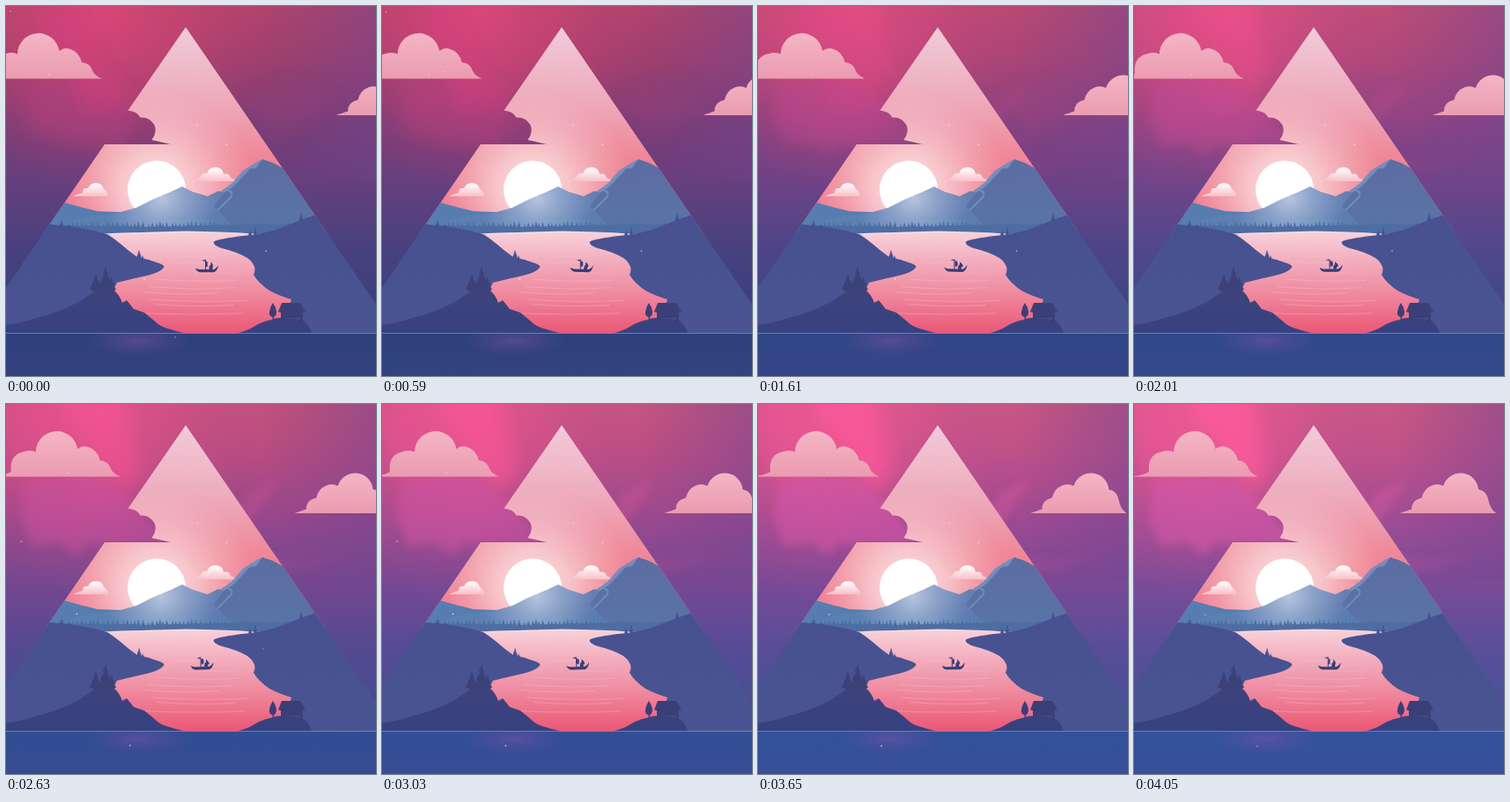
Recreate the animation shown at these times as an HTML page. Size 420 px wide and 420 px high, loop 4250 ms.

```html
<!DOCTYPE html>
<html lang="en">
<head>
<meta charset="utf-8">
<title>Lake at dusk</title>
<style>
html, body { margin: 0; width: 100%; height: 100%; overflow: hidden; background: #303f7b; }
svg { display: block; width: 100vw; height: 100vh; }
</style>
</head>
<body>
<svg viewBox="0 0 420 420" xmlns="http://www.w3.org/2000/svg">
<defs>
  <linearGradient id="duskA" x1="0" y1="0" x2="0" y2="1">
    <stop offset="0" stop-color="#b1446a"/><stop offset=".15" stop-color="#a0406d"/>
    <stop offset=".35" stop-color="#7d3d76"/><stop offset=".55" stop-color="#643f7d"/>
    <stop offset=".75" stop-color="#46417e"/><stop offset="1" stop-color="#34407a"/>
  </linearGradient>
  <linearGradient id="duskB" x1="0" y1="0" x2="0" y2="1">
    <stop offset="0" stop-color="#cb5882"/><stop offset=".15" stop-color="#c0528a"/>
    <stop offset=".35" stop-color="#9f4c94"/><stop offset=".55" stop-color="#7a4b98"/>
    <stop offset=".75" stop-color="#594e9a"/><stop offset="1" stop-color="#465299"/>
  </linearGradient>
  <linearGradient id="sideShade" gradientUnits="userSpaceOnUse" x1="290" y1="20" x2="425" y2="0">
    <stop offset="0" stop-color="#6f4690" stop-opacity="0"/><stop offset="1" stop-color="#6f4690" stop-opacity=".5"/>
  </linearGradient>
  <radialGradient id="glowA" gradientUnits="userSpaceOnUse" cx="110" cy="10" r="200">
    <stop offset="0" stop-color="#dd467a" stop-opacity=".9"/><stop offset=".45" stop-color="#d04573" stop-opacity=".55"/>
    <stop offset="1" stop-color="#b04070" stop-opacity="0"/>
  </radialGradient>
  <radialGradient id="glowB" gradientUnits="userSpaceOnUse" cx="80" cy="10" r="210">
    <stop offset="0" stop-color="#f95a99" stop-opacity=".85"/><stop offset=".45" stop-color="#e25694" stop-opacity=".55"/>
    <stop offset="1" stop-color="#b04f90" stop-opacity="0"/>
  </radialGradient>
  <linearGradient id="baseA" x1="0" y1="0" x2="0" y2="1">
    <stop offset="0" stop-color="#2d417c"/><stop offset="1" stop-color="#34427f"/>
  </linearGradient>
  <linearGradient id="baseB" x1="0" y1="0" x2="0" y2="1">
    <stop offset="0" stop-color="#31539c"/><stop offset="1" stop-color="#3a4f9a"/>
  </linearGradient>
  <radialGradient id="mirror" gradientUnits="userSpaceOnUse" cx="150" cy="380" r="62" gradientTransform="translate(0 266) scale(1 .3)">
    <stop offset="0" stop-color="#8a55ac" stop-opacity=".42"/><stop offset="1" stop-color="#7a4a9a" stop-opacity="0"/>
  </radialGradient>
  <linearGradient id="cloudFill" x1="0" y1="0" x2="0" y2="1">
    <stop offset="0" stop-color="#f4b5c4"/><stop offset="1" stop-color="#eb9bb1"/>
  </linearGradient>
  <linearGradient id="puffFill" x1="0" y1="0" x2="0" y2="1">
    <stop offset=".2" stop-color="#fff5f5"/><stop offset="1" stop-color="#f8c0c8"/>
  </linearGradient>
  <linearGradient id="sky" gradientUnits="userSpaceOnUse" x1="0" y1="24" x2="0" y2="250">
    <stop offset="0" stop-color="#f1cbda"/><stop offset=".38" stop-color="#eea9ba"/>
    <stop offset=".65" stop-color="#ef8798"/><stop offset="1" stop-color="#ee6f86"/>
  </linearGradient>
  <radialGradient id="halo" gradientUnits="userSpaceOnUse" cx="171" cy="208" r="118">
    <stop offset="0" stop-color="#fff4f2" stop-opacity=".85"/><stop offset=".35" stop-color="#fde0e0" stop-opacity=".6"/>
    <stop offset=".65" stop-color="#fbcfd2" stop-opacity=".24"/><stop offset="1" stop-color="#f7a8b2" stop-opacity="0"/>
  </radialGradient>
  <linearGradient id="midHill" gradientUnits="userSpaceOnUse" x1="0" y1="205" x2="0" y2="256">
    <stop offset="0" stop-color="#687fb1"/><stop offset="1" stop-color="#587cb0"/>
  </linearGradient>
  <linearGradient id="peak" gradientUnits="userSpaceOnUse" x1="0" y1="174" x2="0" y2="258">
    <stop offset="0" stop-color="#5c6da2"/><stop offset="1" stop-color="#5974a7"/>
  </linearGradient>
  <radialGradient id="shine" gradientUnits="userSpaceOnUse" cx="176" cy="218" r="64">
    <stop offset="0" stop-color="#d3dcee" stop-opacity=".75"/><stop offset=".5" stop-color="#bccbe5" stop-opacity=".4"/>
    <stop offset="1" stop-color="#b4c4e2" stop-opacity="0"/>
  </radialGradient>
  <linearGradient id="lake" gradientUnits="userSpaceOnUse" x1="0" y1="256" x2="0" y2="372">
    <stop offset="0" stop-color="#f9d2da"/><stop offset=".25" stop-color="#f3b2c1"/>
    <stop offset=".6" stop-color="#ef8a9f"/><stop offset="1" stop-color="#eb5675"/>
  </linearGradient>
  <linearGradient id="land" gradientUnits="userSpaceOnUse" x1="0" y1="238" x2="0" y2="372">
    <stop offset="0" stop-color="#475190"/><stop offset="1" stop-color="#4a5492"/>
  </linearGradient>
  <linearGradient id="front" gradientUnits="userSpaceOnUse" x1="0" y1="320" x2="0" y2="372">
    <stop offset="0" stop-color="#3e427b"/><stop offset="1" stop-color="#36427f"/>
  </linearGradient>
  <filter id="soft" x="-50%" y="-50%" width="200%" height="200%"><feGaussianBlur stdDeviation="9"/></filter>
  <filter id="mist" x="-50%" y="-50%" width="200%" height="200%"><feGaussianBlur stdDeviation="4"/></filter>
  <clipPath id="frame">
    <path d="M204 24 L443 372 H-36 L112 157 H187 Q175 154 165.500 152 Q172 143 168.500 135 Q163 125.500 152.500 126.500 Q149 119.500 138.500 118.500 Z"/>
  </clipPath>
  <clipPath id="hillClip">
    <path d="M66 258 V240 L126 235 L148 229 L166 220 L185 212 L200 205 L212 211 L229 216 L241 213 L262 258Z"/>
  </clipPath>
</defs>

<!-- outer sky, dark state -->
<rect width="420" height="372" fill="url(#duskA)"/>
<rect width="420" height="372" fill="url(#glowA)"/>
<g filter="url(#soft)">
  <path d="M20 88 L75 80 L150 118 L130 160 L60 150 L28 140Z" fill="#b03f7f" opacity=".55"/>
  <path d="M35 0 L75 0 L110 70 L150 110 L90 120Z" fill="#d8437f" opacity=".4"/>
  <path d="M270 105 L330 85 L375 110 L310 150Z" fill="#974278" opacity=".35"/>
</g>
<rect y="372" width="420" height="48" fill="url(#baseA)"/>

<!-- outer sky, bright state -->
<g id="bright">
  <rect width="420" height="372" fill="url(#duskB)"/>
  <rect width="420" height="372" fill="url(#glowB)"/>
  <g filter="url(#soft)">
    <path d="M62 -20 L132 -20 L150 70 L135 100 L100 60Z" fill="#ff5a9c" opacity=".7"/>
    <path d="M-10 10 L30 -10 L70 80 L30 95Z" fill="#f0589c" opacity=".35"/>
  </g>
  <g filter="url(#mist)">
    <path d="M20 92 L70 80 L120 90 L150 118 L185 160 L92 158 L80 172 L60 157 L30 162 L18 130Z" fill="#d256a8" opacity=".62"/>
    <path d="M258 128 L275 100 L312 84 L296 108 L274 140Z" fill="#d2589c" opacity=".5"/>
    <path d="M290 172 L345 176 L392 164 L345 188 L305 192Z" fill="#a8509c" opacity=".4"/>
  </g>
  <rect y="372" width="420" height="48" fill="url(#baseB)"/>
</g>
<rect width="420" height="200" fill="url(#sideShade)"/>
<rect y="372" width="420" height="48" fill="url(#mirror)"/>

<path id="cloudL" fill="url(#cloudFill)" d="M-35 82.500 Q-22 81 -15 77 Q-17 57 0 54 Q7 52 13 54.500 A23.900 23.900 0 0 1 60.500 51 Q66 46.500 73 49 Q83 52 86 64 Q95 64 99 75 Q102 80 109 82.500Z"/>
<path id="cloudR" fill="url(#cloudFill)" d="M302 124 Q310 121 315 119.500 Q315 109 326.500 106.500 Q329 96 338 92.500 Q345 90 351 93 A20.500 20.500 0 0 1 391 97 Q400 98 402.500 110 Q404 119 411 124Z"/>

<g clip-path="url(#frame)">
  <rect x="40" y="20" width="340" height="236" fill="url(#sky)"/>
  <g id="rings" fill="#fff"></g>
  <circle cx="171" cy="208" r="118" fill="url(#halo)"/>
  <circle cx="171" cy="208.500" r="33" fill="#fff"/>
  <path fill="url(#puffFill)" d="M212 199 Q218 196 221 194 Q223 189 228 190 Q231 182 239 183 Q246 184 247 191 Q253 189 255 195 Q259 197 263 199Z"/>
  <path fill="url(#puffFill)" d="M76 216 Q82 213 87 212 Q87 206 93 207 Q96 200 103 201 Q110 202 111 208 Q115 210 116 216Z"/>

  <path fill="url(#peak)" d="M212 258 L222 220 L238 214 L249 207 L257 201 L269 187 L280 180 L291 174 L303 178 L318 186 L400 186 V258Z"/>
  <path fill="#7e95c1" opacity=".8" d="M291 174 L284 184 L277 185 L264 199 L257 206 L249 211 L242 216 L238 214 L249 207 L257 201 L269 187 L280 180Z"/>
  <path fill="none" stroke="#7e95c1" stroke-width="2" opacity=".7" d="M252 209 Q259 212 255 217 Q244 228 232 240"/>
  <path fill="#577db0" d="M30 222 L66 223 L84 228 L104 233 L130 234 L160 245 L160 260 L30 260Z"/>
  <path fill="url(#midHill)" d="M90 258 L126 235 L148 229 L166 220 L185 212 L200 205 L212 211 L229 216 L241 210 L247 212 L236 228 L256 248 L270 260Z"/>
  <path fill="#5f86b7" opacity=".55" d="M70 246 Q110 231 142 238 Q178 247 212 241 Q240 240 264 258 L60 258Z"/>
  <circle cx="176" cy="218" r="64" fill="url(#shine)" clip-path="url(#hillClip)"/>
  <path fill="#4e6da3" d="M40 260 V250 Q100 248 165 251 Q240 248 352 247 V260Z"/>
  <g id="forest" fill="#4e6da3"></g>

  <path fill="url(#lake)" d="M105 258.500 Q170 256.500 205 255.500 Q240 256.500 292 259 L340 300 V372 H110 V300Z"/>
  <path d="M120 258.500 Q165 257 205 256.500 T280 259" fill="none" stroke="#fff0f2" opacity=".6"/>
  <g id="waves" fill="none" stroke="#fad3dc" stroke-linecap="round"></g>

  <g id="boat" fill="#363d77">
    <path d="M-13 -2.500 L-9 -1 H8 L11 -3 L13 -6 Q12.500 .5 8 2.200 H-8 Q-12 1 -13 -2.500Z"/>
    <path d="M-2 -1 V-12 H-1 V-1Z M4.500 -1 V-9 H5.500 V-1Z"/>
    <path d="M-2 -12 L-6 -11.200 L-2 -10Z"/>
    <path id="sailA"/>
    <path id="sailB"/>
    <path d="M2.500 -1 Q2.500 -6 4.500 -6 Q6.500 -6 6.500 -1Z"/>
  </g>

  <path fill="url(#land)" d="M-40 372 V248 H50 Q85 250 115 259 Q123 264 130 270 Q139 278 149 285 Q160 287 172 291.500 Q181 294 179 297 Q174 303 160 306 Q142 310 126 314 L122 322 L135 345 L150 372Z"/>
  <path fill="url(#land)" d="M450 372 V230 L352 237 Q330 244 312 252 Q298 257 278 260 Q247 263 236.500 267 Q233 271 245 275 Q262 279 274 286 Q286 295 281 305 Q286 314 299 323 Q310 329 324 333 L312 372Z"/>
  <g id="landTrees" fill="#475190"></g>

  <path fill="url(#front)" d="M-40 372 V366 Q10 363 35 354 Q70 346 96 327 Q108 320 122 322 Q129 328 132 337 L137 334 L145 344 L157 348 L168 357 Q174 363 180 365 Q192 369 205 372Z"/>
  <path fill="url(#front)" d="M260 372 Q274 369 283 363 Q291 358 300 356.500 Q308 353 318 354 Q336 354 342 361 L348 372Z"/>
  <g id="frontTrees" fill="#3d4179"></g>
  <path fill="#3b3f78" d="M309 347 L313 337 H334 L340 347 L337 348 V358 H333 V354 H316 V358 H312 V348Z"/>
  <path fill="#3b3f78" d="M303 337 Q306 341 307 347 Q307 352 304 353 V358 H302.500 V353 Q298 352 299 347 Q300 341 303 337Z"/>
</g>
<rect y="371" width="420" height="1" fill="#7288c6" opacity=".85"/>
<g id="stars" fill="#ffe3ef"></g>
</svg>
<script>
const LOOP = 4250;
const steps = [0, 200, 390, 590, 790, 990, 1210, 1410, 1610, 1810, 2010,
  2210, 2410, 2630, 2830, 3030, 3250, 3440, 3650, 3850, 4050];
const $ = id => document.getElementById(id);

function add(parent, tag, attrs) {
  const el = document.createElementNS('http://www.w3.org/2000/svg', tag);
  for (const key in attrs) el.setAttribute(key, attrs[key]);
  parent.appendChild(el);
  return el;
}

let seed = 7;
function rand() {
  seed = (seed * 16807) % 2147483647;
  return seed / 2147483647;
}

function pine(group, x, base, h, w) {
  let d = `M${x} ${base - h}`;
  for (let i = 1; i <= 3; i++) d += `L${x + w * i / 3} ${base - h + h * .28 * i}h${-w / 6}`;
  d += `L${x + .8} ${base}H${x - .8}`;
  for (let i = 3; i >= 1; i--) d += `L${x - w * i / 3 + w / 6} ${base - h + h * .28 * i}h${-w / 6}`;
  add(group, 'path', { d: d + 'Z' });
}

for (let r = 38; r < 115; r += 7)
  add($('rings'), 'circle', { cx: 171, cy: 208, r, opacity: .022 });

for (let x = 54; x < 292; x += 3 + rand() * 4) pine($('forest'), x, 254, 6 + rand() * 4, 2.8);
[[151, 287, 10, 3], [155, 289, 6, 2], [335, 245, 10, 2.5], [283, 260, 10, 2], [277, 261, 8, 2],
 [63, 251, 8, 2], [72, 252, 5, 2]].forEach(p => pine($('landTrees'), ...p));
[[113, 325, 29, 9], [102, 325, 21, 7.5], [120, 325, 18, 5]].forEach(p => pine($('frontTrees'), ...p));

const waves = [];
for (let i = 0; i < 12; i++) {
  const y = 268 + i * 7 + rand() * 3;
  const low = y > 310;
  const x = (low ? 135 : 178) + rand() * 40;
  const w = low ? 80 + rand() * 60 : 24 + rand() * 35;
  const el = add($('waves'), 'path', {
    d: `M${x} ${y}q${w / 2} ${low ? 4 : 0} ${w} 1`,
    'stroke-width': low ? 1.2 : .7, opacity: low ? .24 : .3
  });
  waves.push({ el, phase: rand() * 6.28 });
}

// x, y, radius, first and last moment, drift per second
const stars = [
  [217, 135, .8, 0, 4250, 0, 0], [250.500, 157.500, .8, 0, 4250, 0, 0],
  [49, 78, .7, 0, 4250, 8, 0], [69, 74, .7, 300, 1800, 0, .8],
  [157, 310, .9, 0, 2000, -1, 0], [295, 278, .8, 0, 2800, -1, 0],
  [5, 6, .7, 0, 1600, -1, 1], [192, 376, .7, 0, 400, 0, 0],
  [79, 237, .9, 2200, 4250, .5, .5], [19, 156, .8, 2400, 3700, -.6, 0],
  [142, 386, .9, 2400, 4250, -.5, .6]
].map(([x, y, r, from, to, vx, vy]) =>
  ({ el: add($('stars'), 'circle', { r }), x, y, from, to, vx, vy }));

function draw(ms) {
  const s = ms / 1000;
  const p = ms / 4050;
  $('bright').setAttribute('opacity', (1 - Math.cos(Math.PI * p)) / 2);
  $('cloudL').setAttribute('transform', `translate(${7.9 * s} 0)`);
  $('cloudR').setAttribute('transform', `translate(${73 - 18 * s} 0)`);

  const drift = 6.2 * Math.sin(p * Math.PI / 2);
  const tilt = 2 * Math.sin(p * Math.PI * 2);
  $('boat').setAttribute('transform', `translate(${228 - drift} ${300 - drift / 8}) rotate(${tilt})`);
  const puff = .35 + .65 * Math.sin(Math.PI * p);
  $('sailA').setAttribute('d', `M-1 -10h${1 + 1.5 * puff}q${1.5 * puff} 3 0 6h${-1 - 1.5 * puff}Z`);
  $('sailB').setAttribute('d', `M5 -8.500q${2 + 2 * puff} 2 ${1 + 2 * puff} 5h${-1 - 2 * puff}Z`);

  for (const w of waves) w.el.setAttribute('transform', `translate(${1.5 * Math.sin(w.phase + s * .8)} 0)`);
  for (const st of stars) {
    st.el.setAttribute('cx', st.x + st.vx * s);
    st.el.setAttribute('cy', st.y + st.vy * s);
    const fade = Math.min(1, Math.max(0, (st.to - ms) / 300), st.from ? Math.max(0, (ms - st.from) / 200) : 1);
    st.el.setAttribute('opacity', .75 * fade);
  }
}

function tick(now) {
  const t = now % LOOP;
  draw(steps.filter(v => v <= t).pop());
  requestAnimationFrame(() => tick(performance.now()));
}
tick(performance.now());
</script>
</body>
</html>
```
